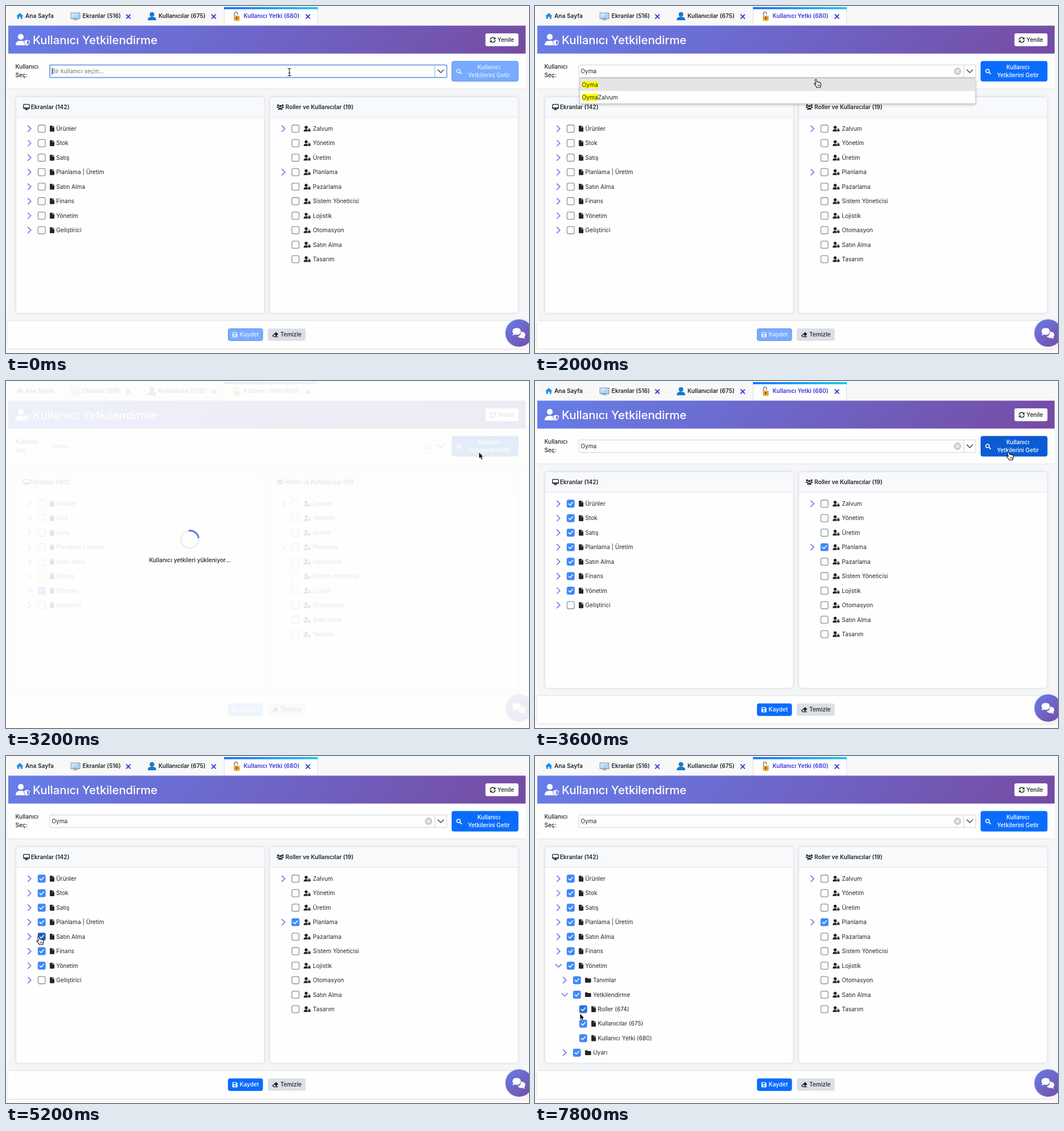
An HTML page for the animation above (8 s loop, 919 px wide and 609 px high).

```html
<!DOCTYPE html>
<html lang="tr">
<head>
<meta charset="utf-8">
<title>Kullanıcı Yetkilendirme</title>
<style>
html, body { margin: 0; width: 100%; height: 100%; overflow: hidden; background: #fdfaf7; }
svg { display: block; width: 100%; height: 100%; }
text { font: 400 10.15px Inter, sans-serif; fill: #212529; white-space: pre; }
.m { font-weight: 500; }
.b { font-weight: 600; }
</style>
</head>
<body>
<svg viewBox="0 0 919 609">
  <defs>
    <linearGradient id="head" gradientUnits="userSpaceOnUse" x1="219" y1="-180" x2="698" y2="299">
      <stop stop-color="#667eea"/><stop offset="1" stop-color="#764ba2"/>
    </linearGradient>
    <linearGradient id="chat" x2="1" y2="1">
      <stop stop-color="#667eea"/><stop offset="1" stop-color="#764ba2"/>
    </linearGradient>
    <linearGradient id="tab"><stop stop-color="#0d6efd"/><stop offset="1" stop-color="#14c4f8"/></linearGradient>
    <filter id="soft" x="-10%" y="-30%" width="120%" height="180%">
      <feDropShadow dx="0" dy="1.5" stdDeviation="2" flood-opacity=".22"/>
    </filter>
    <filter id="faint" x="-10%" y="-10%" width="120%" height="120%">
      <feDropShadow dx="0" dy="0" stdDeviation="2" flood-opacity=".1"/>
    </filter>
    <clipPath id="list"><rect x="18" y="196" width="882" height="342"/></clipPath>
  </defs>
  <g id="page"></g>
  <g id="live"></g>
  <g id="veil"></g>
  <g id="mouse"></g>
</svg>
<script>
const LOOP = 8000, TICK = 200, ROW = 25.45;
const INK = '#212529', BLUE = '#0a6cfd', LINE = '#e1e4e9';
const USER = 'Oyma', FIRM = 'Zalvum';
const $ = id => document.getElementById(id);
const pen = document.createElement('canvas').getContext('2d');
const widthOf = s => { pen.font = '10.15px Inter, sans-serif'; return pen.measureText(s).width; };

const text = (x, y, s, cls = '', more = '') => `<text x="${x}" y="${y}" class="${cls}" ${more}>${s}</text>`;
const rect = (x, y, w, h, fill, more = '') => `<rect x="${x}" y="${y}" width="${w}" height="${h}" fill="${fill}" ${more}/>`;
const circle = (x, y, r, fill, more = '') => `<circle cx="${x}" cy="${y}" r="${r}" fill="${fill}" ${more}/>`;
const path = (d, fill = INK, more = '') => `<path d="${d}" fill="${fill}" ${more}/>`;
const line = (d, stroke, w = 1, more = '') =>
  path(d, 'none', `stroke="${stroke}" stroke-width="${w}" stroke-linecap="round" stroke-linejoin="round" ${more}`);
const at = (x, y, body, more = '') => `<g transform="translate(${x} ${y})" ${more}>${body}</g>`;

// Icons, drawn around their centre
const icon = {
  home: path('M-6 0L0 -5.5L6 0L4.5 .8V5H1.3V1.5H-1.3V5H-4.5V.8Z', '#1794ee'),
  screen: rect(-8.5, -6.5, 17, 11.5, '#8d99a6', 'rx="1"') + rect(-7.3, -5.3, 14.6, 8.8, '#a9d5f7') +
    path('M-7.3 3.5V-5.3H5Z', '#c8e5fb') + rect(-2, 5, 4, 1.5, '#8d99a6') + rect(-4.5, 6, 9, 1.2, '#b3bcc5'),
  bust: circle(0, -3.2, 4, '#1478d4') + path('M-7.5 7Q-7.5 1 -2 1H2Q7.5 1 7.5 7Z', '#1478d4'),
  lock: line('M-3.6 -1V-4.6A2.7 2.7 0 0 1 1.8 -4.6V-3.6', '#8b8f96', 1.8) +
    rect(-4.5, -1, 10, 9, '#eba83a', 'rx="1.2"') + rect(-4.5, 3.2, 10, 1, '#cf8a22') +
    circle(.5, 2.6, 1.3, '#5d4216') + rect(0, 3, 1, 2.8, '#5d4216'),
  close: line('M-3.3 -3.3L3.3 3.3M3.3 -3.3L-3.3 3.3', '#3a35dc', 1.9),
  shielded: circle(-3.5, -5.4, 5.1, '#fff') + path('M-12.5 9.6Q-12.5 1.5 -5 1.5H-1.5Q1.5 1.5 3.2 3Q3 7 6 9.6Z', '#fff') +
    path('M7.5 -.8L13 1.4Q13 8 7.5 10.8Q2 8 2 1.4Z', '#fff', 'stroke="#6a72dd" stroke-width="1"') +
    path('M7.5 1.2V8.8Q11 6.5 11.2 2.7Z', '#6a72dd'),
  refresh: line('M-4.2 -.8A4.3 4.3 0 0 1 3.6 -2.4M4.2 .8A4.3 4.3 0 0 1 -3.6 2.4', INK, 1.4) +
    path('M4.8 -5V-1H.8ZM-4.8 5V1H-.8Z'),
  monitor: rect(-5.2, -4.3, 10.4, 7.2, 'none', `rx="1" stroke="${INK}" stroke-width="1.3"`) +
    rect(-5, 1.2, 10, 1.6, INK) + path('M-1 3H1L1.4 4.6H3V5.6H-3V4.6H-1.4Z'),
  group: circle(-4, -2.8, 1.7, INK) + circle(4, -2.8, 1.7, INK) + circle(0, -1.2, 2, INK) +
    path('M-6.5 1.8Q-6.5 -.6 -4 -.6L-2.5 -.3Q-2.6 1 -1.6 1.8ZM6.5 1.8Q6.5 -.6 4 -.6L2.5 -.3Q2.6 1 1.6 1.8ZM-4 4.8Q-4 2 -1.5 2H1.5Q4 2 4 4.8Z'),
  file: path('M-4 -4.2Q-4 -5.2 -3 -5.2H.6V-2H4V4.2Q4 5.2 3 5.2H-3Q-4 5.2 -4 4.2ZM1.3 -5.2L4 -2.6H1.3Z'),
  folder: path('M-5.3 -3.2Q-5.3 -4.2 -4.3 -4.2H-1.4L0 -2.9H4.3Q5.3 -2.9 5.3 -1.9V3.2Q5.3 4.2 4.3 4.2H-4.3Q-5.3 4.2 -5.3 3.2Z'),
  role: circle(-1.6, -2.4, 2.7, INK) + path('M-6 5Q-6 1 -2.5 1H0L1.5 2V5Z') +
    rect(1.4, 1, 5, 4.2, INK, 'rx=".8" stroke="#fff" stroke-width=".7"') + line('M2.8 1V.2Q3.9 -1.2 5 .2V1', INK, .9),
  search: circle(-.8, -.8, 3.1, 'none', 'stroke="#fff" stroke-width="1.5"') + line('M1.6 1.6L4.4 4.4', '#fff', 1.7),
  save: path('M-4.5 -3.6Q-4.5 -4.5 -3.6 -4.5H2.4L4.5 -2.4V3.6Q4.5 4.5 3.6 4.5H-3.6Q-4.5 4.5 -4.5 3.6ZM-3 -3.2V-.8H2V-3.2ZM0 .5A1.5 1.5 0 1 0 .01 .5Z', '#fff', 'fill-rule="evenodd"'),
  eraser: path('M-5 1.3L1 -4.3Q1.7 -4.7 2.3 -4.2L4.8 -1.7Q5.3 -1 4.8 -.4L1.6 3.1H5V4.3H-2.2L-5 2.3Q-5.4 1.8 -5 1.3ZM-3.4 1.7L-1.7 3.1H0L1.2 1.9L-1.3 -.4Z', INK, 'fill-rule="evenodd"'),
  bubbles: path('M4 -2.5Q11.5 -2 11.5 3.2Q11.5 5.6 9.8 7Q10 8.6 11.3 9.6Q8.6 9.8 6.8 8.5Q1 9.4 -1.8 5.4Q4.6 4 4 -2.5Z', '#fff') +
    path('M-3.6 -9Q3.6 -9 3.6 -3Q3.6 3 -3.6 3Q-5.2 3 -6.8 2.5Q-8.6 3.9 -11.2 3.9Q-9.8 2.4 -9.6 .6Q-11 -1 -11 -3Q-11 -9 -3.6 -9Z', '#fff'),
  arrow: path('M-3.5 -6.5V4.6L-1 2.4L.9 6.6L3 5.7L1.2 1.6H4.4Z', '#000', 'stroke="#fff" stroke-width=".8"'),
  beam: line('M-2.6 -6.5Q0 -6.5 0 -5Q0 -6.5 2.6 -6.5M0 -5V5M-2.6 6.5Q0 6.5 0 5Q0 6.5 2.6 6.5M-1.2 1.5H1.2', '#111', 1.1),
  hand: path('M-2.9 .5L-4.3 -5.5Q-4.3 -7.3 -2.8 -7.2Q-2 -7 -1.7 -5.8L-.8 -2.5Q.4 -3.6 1.3 -2.3Q2.6 -3.2 3.4 -1.8Q5 -2.3 5.6 -.6Q6.6 2 5.4 4.4L5 7H-1.4Q-2 5 -5.3 1.8Q-6.4 .4 -5.3 -.1Q-4.3 -.4 -2.9 1.2Z',
    '#fff', 'stroke="#111" stroke-width="1.1" stroke-linejoin="round"') + line('M.3 2V4.6M2 2V4.6M3.7 2V4.6', '#333', .8)
};
const put = (name, x, y, more) => at(x, y, icon[name], more);

const branches = ['Ürünler', 'Stok', 'Satış', 'Planlama | Üretim', 'Satın Alma', 'Finans', 'Yönetim', 'Geliştirici'];
const roles = [FIRM, 'Yönetim', 'Üretim', 'Planlama', 'Pazarlama', 'Sistem Yöneticisi', 'Lojistik', 'Otomasyon', 'Satın Alma', 'Tasarım'];

const card = (x, name, title) =>
  rect(x, 159.5, 436.5, 379.5, '#fefefe', `rx="5" stroke="${LINE}" filter="url(#faint)"`) +
  path(`M${x + .5} 195V165Q${x + .5} 160 ${x + 5.5} 160H${x + 431}Q${x + 436} 160 ${x + 436} 165V195Z`, '#f7f9fb') +
  line(`M${x} 195.5H${x + 436}`, LINE) + put(name, x + 18.5, 177) + text(x + (name == 'group' ? 27.5 : 26.2), 180.6, title, 'b');

function drawPage() {
  const tabs = [['screen', 122, 134.5, 'Ekranlar (516)', 215], ['bust', 256.5, 268, 'Kullanıcılar (675)', 365],
    ['lock', 405, 417.5, 'Kullanıcı Yetki (680)', 530.5]];
  $('page').innerHTML =
    rect(0, 0, 919, 609, '#fdfaf7') + rect(4, 2, 915, 601, '#f5f6f8') + rect(4, 0, 915, 35, '#f8f8f8') +
    rect(383.5, 3, 164, 32, '#fefefe', 'stroke="#dcdee2"') + rect(383, 2, 165, 3.6, 'url(#tab)') +
    put('home', 24.3, 17.5) + text(34, 21, 'Ana Sayfa', 'b') +
    tabs.map(([ic, x, tx, s, cx], i) => put(ic, x, 18) +
      text(tx, 21.4, s, 'b', i == 2 ? 'style="fill:#3a35dc"' : '') + put('close', cx, 18.5)).join('') +
    rect(4, 83, 909, 62.5, '#fefefe') + line('M4 145.5H913', LINE) + rect(4, 34.5, 909, 49, 'url(#head)') +
    put('shielded', 29.5, 59.5) + text(47, 66.7, 'Kullanıcı Yetkilendirme', 'm', 'style="font-size:20.3px;fill:#fff"') +
    rect(842.5, 48, 58, 22.5, '#fcfcfd', 'rx="3"') + put('refresh', 855.3, 59.5) + text(863.5, 63, 'Yenile', 'm') +
    text(16.5, 110, 'Kullanıcı', 'm') + text(16.5, 125.4, 'Seç:', 'm') +
    card(17.5, 'monitor', 'Ekranlar (142)') + card(463.5, 'group', 'Roller ve Kullanıcılar (19)') +
    rect(4, 553, 909, 48, '#fefefe', 'filter="url(#faint)"') +
    rect(460, 566, 66.5, 21.5, '#dcdfe3', 'rx="3"') + put('eraser', 473, 577) + text(482, 580.4, 'Temizle', 'm') +
    circle(901.5, 574, 24, 'url(#chat)', 'filter="url(#faint)"') + put('bubbles', 901, 574);
}

// state: 0 empty, 1 checked, 2 partial
function box(x, y, state, dark) {
  const fill = dark || (state ? '#4088fa' : '#fefefe');
  return rect(x - 6.3, y - 6.3, 12.6, 12.6, fill, `rx="2.3" stroke="${state ? fill : '#8f9398'}" stroke-width="1.3"`) +
    (state == 1 ? line('M-3.4 .2L-1 2.6L3.6 -2.6', '#fff', 1.5, `transform="translate(${x} ${y})"`) : '') +
    (state == 2 ? line(`M${x - 3} ${y}h6`, '#fff', 1.5) : '');
}

const chevron = (x, y, open) => line(open ? 'M-5 -2.4L0 2.6L5 -2.4' : 'M-2.6 -5L2.6 0L-2.6 5', '#7079e6', 1.6, `transform="translate(${x} ${y})"`);

function leftRows(t) {
  const rows = [];
  const add = (name, depth, fold, ic, on, dark) => rows.push({ name, depth, fold, ic, on, dark });
  const unfolded = t >= 6000, deep = t >= 6800;
  for (const name of branches) {
    const main = name == 'Yönetim';
    const on = t >= 3600 ? +(name != 'Geliştirici') : t >= 3000 && main ? 2 : 0;
    add(name, 0, main && unfolded ? 2 : 1, 'file', on, name == 'Satın Alma' && t == 5200 && '#1c5fc0');
    if (!main || !unfolded) continue;
    add('Tanımlar', 1, 1, 'folder', 1);
    add('Yetkilendirme', 1, deep ? 2 : 1, 'folder', 1);
    if (deep) ['Roller (674)', 'Kullanıcılar (675)', 'Kullanıcı Yetki (680)'].forEach((s, i) =>
      add(s, 2, 0, 'file', 1, !i && (t == 7800 ? '#3070dc' : t >= 7400 && '#1c5fc0')));
    add('Uyarı', 1, 1, 'folder', 1);
  }
  return rows;
}

function trees(t) {
  const left = leftRows(t).map((r, i) => {
    const y = 215.3 + i * ROW, x = 62.7 + r.depth * 11;
    return (r.fold ? chevron(x - 21.5, y, r.fold == 2) : '') + box(x, y, r.on, r.dark) +
      put(r.ic, x + (r.ic == 'folder' ? 19.5 : 18.3), y) + text(x + (r.ic == 'folder' ? 28.3 : 25.6), y + 3.6, r.name);
  });
  const right = roles.map((s, i) => {
    const y = 215.3 + i * ROW;
    return (i % 3 == 0 && i < 4 ? chevron(487.5, y) : '') + box(508.7, y, i == 3 && t >= 3600 ? 1 : 0) +
      put('role', 529, y) + text(539.3, y + 3.6, s);
  });
  return `<g clip-path="url(#list)">${left.join('')}${right.join('')}</g>`;
}

function search(t) {
  const typed = USER.slice(0, Math.floor(t / 200)), focus = t < 1800, chosen = !focus;
  let out = rect(77, 103.5, 697.5, 22, '#fefefe', focus ? 'rx="1.5" stroke="#7ba9ea" stroke-width="2"' : 'rx="1.5" stroke="#cfd2d6"') +
    line('M753.5 104V125', focus ? '#8fb4e8' : '#cfd2d6') + line('M759 112L764 117L769 112', '#4c5057', 1.6) +
    text(80.3, 118, typed || 'Bir kullanıcı seçin...', '', typed ? '' : 'style="fill:#70757b"');
  if (focus && t % 1200 < 800) out += rect(80.6 + widthOf(typed), 108.5, 1, 12, '#111');
  if (chosen) out += circle(742.5, 114.5, 6.5, '#c9cbce') + line('M740 112l5 5M745 112l-5 5', '#fff', 1.4);
  return out;
}

function menu(t) {
  if (t < 400 || t >= 2200) return '';
  const hit = USER.slice(0, Math.min(4, t / 200 - 1)), w = widthOf(hit);
  return rect(78.5, 126.5, 695.5, 45, '#fefefe', 'stroke="#bcc5d0" filter="url(#soft)"') +
    (t >= 1600 ? rect(79, 127, 694.5, 22, '#e5e5e5') : '') +
    [USER, USER + FIRM].map((s, i) => rect(83, 132 + i * 22, w, 12.5, '#ff0') + text(82.6, 142.2 + i * 22, s)).join('');
}

function buttons(t) {
  const ready = t >= 1800, hover = t >= 2800 && t < 4600, loaded = t >= 3600;
  const face = (x, y, w, h, fill, on) => rect(x, y, w, h, on ? fill : '#78abfe', `rx="3" stroke="${on ? fill : '#5c8fdf'}"`);
  const label = (x, y, s, on, more = '') => text(x, y, s, 'm', `style="fill:#fff" opacity="${on ? 1 : .8}" ${more}`);
  return face(783.5, 97, 116.5, 35, hover ? '#0b5bd3' : BLUE, ready) + put('search', 796, 114.8, `opacity="${ready ? 1 : .8}"`) +
    label(848.5, 111, 'Kullanıcı', ready, 'text-anchor="middle"') + label(848.5, 125, 'Yetkilerini Getir', ready, 'text-anchor="middle"') +
    face(390.5, 566.3, 60.5, 21, BLUE, loaded) + put('save', 402.3, 577, `opacity="${loaded ? 1 : .8}"`) + label(410.5, 580.4, 'Kaydet', loaded);
}

function veil(t) {
  if (t < 3000 || t >= 3600) return '';
  return rect(0, 0, 919, 609, '#fefefd', 'opacity=".89"') + circle(323, 278, 15.6, 'none', 'stroke="#eeeeef" stroke-width="3"') +
    path('M0 -15.6A15.6 15.6 0 0 1 15.6 0', 'none',
      `stroke="#5c7be4" stroke-width="3" transform="translate(323 278) rotate(${(t - 3200) * .36 - 8})"`) +
    text(323, 318.4, 'Kullanıcı yetkileri yükleniyor...', 'm', 'text-anchor="middle"');
}

// Pointer path: time, x, y, shape from that time on
const route = [
  [0, 498, 116, 'beam'], [400, 498, 116, ''], [1400, 498, 117, 'beam'], [1600, 497, 131, 'hand'], [2000, 496.5, 136, 'hand'],
  [2200, 497, 137, 'arrow'], [2800, 831, 132, 'hand'], [3000, 834.5, 131.5, 'arrow'], [3600, 834.5, 131.5, 'hand'],
  [4000, 832, 132, 'hand'], [4400, 821.5, 133.5, 'hand'], [4600, 720, 165, 'arrow'], [5000, 140, 312, 'arrow'],
  [5200, 60, 324, 'hand'], [5400, 52, 338, 'arrow'], [5800, 43, 372, 'hand'], [6200, 44, 374, 'arrow'],
  [6600, 53, 424, 'hand'], [7000, 55, 426, 'arrow'], [7400, 84, 449, 'hand'], [7600, 84, 450, 'hand'], [7800, 82.5, 458.3, 'arrow'], [8000, 82, 458, 'arrow']
];

function mouse(t) {
  const i = route.findIndex(p => p[0] > t) - 1;
  const [a, x, y, shape] = route[i], [b, nx, ny] = route[i + 1];
  const k = (t - a) / (b - a);
  return shape ? put(shape, x + (nx - x) * k, y + (ny - y) * k) : '';
}

function render(t) {
  $('live').innerHTML = search(t) + buttons(t) + trees(t) + menu(t);
  $('veil').innerHTML = veil(t);
  $('mouse').innerHTML = mouse(t);
}

let start = performance.now(), shown = -1;
function frame(now) {
  const t = Math.floor(Math.max(0, now - start) % LOOP / TICK) * TICK;
  if (t != shown) render(shown = t);
  requestAnimationFrame(frame);
}
drawPage();
render(0);
requestAnimationFrame(frame);
</script>
</body>
</html>
```
